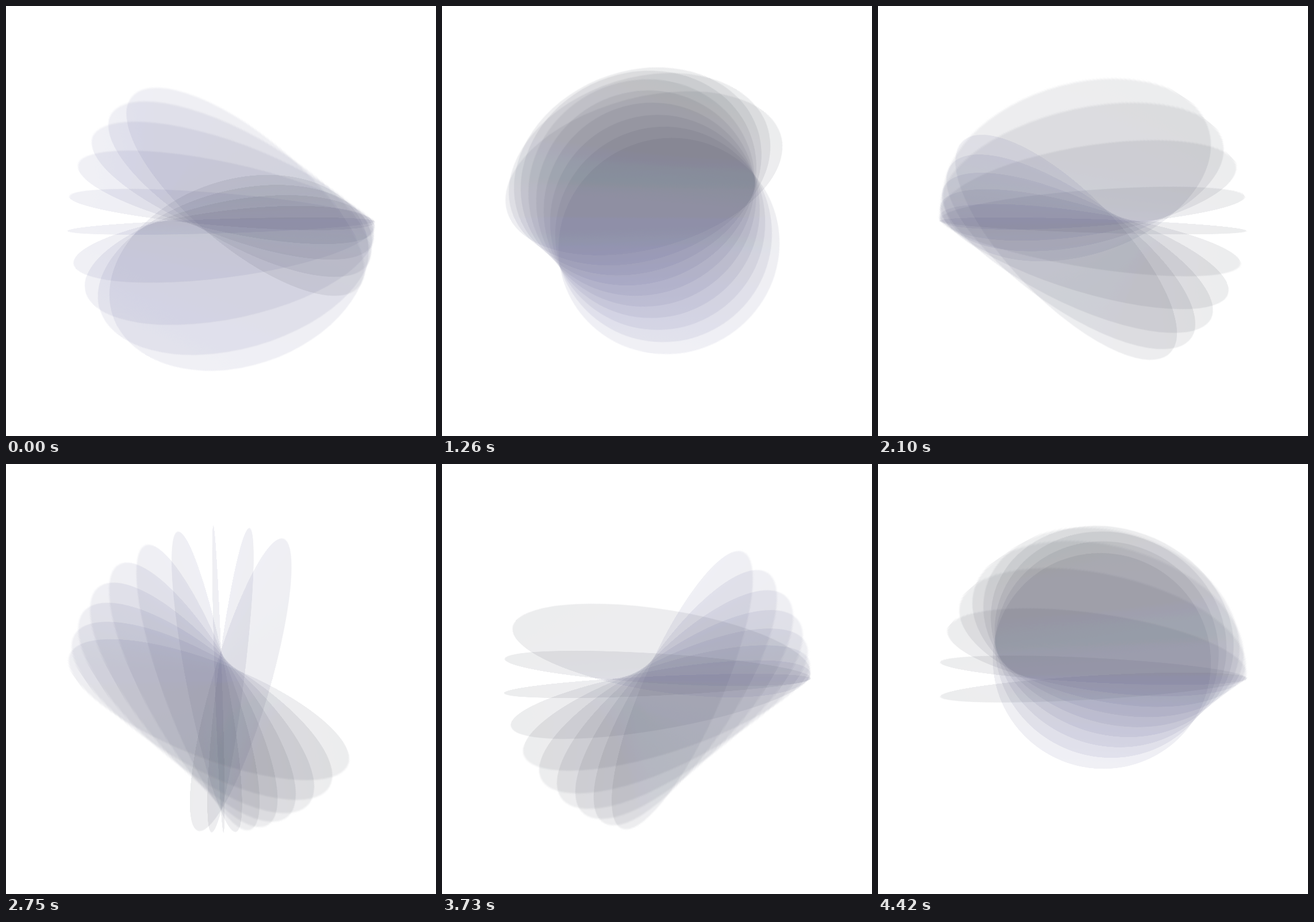
An HTML page for the animation above (4.45 s loop, 748x748 px).

```html
<!DOCTYPE html>
<html lang="en">
<head>
<meta charset="utf-8">
<title>Turning discs</title>
<style>
  html, body {
    margin: 0;
    width: 100%;
    height: 100%;
    overflow: hidden;
    background: #fff;
  }
  #stage {
    position: relative;
    width: 100vw;
    height: 100vh;
    overflow: hidden;
    perspective: 35vmin;
  }
  .disc {
    position: absolute;
    left: calc(50% - 25vmin);
    top: calc(50% - 25vmin);
    width: 50vmin;
    height: 50vmin;
    border-radius: 50%;
    background: linear-gradient(rgb(94, 94, 152), rgb(60, 64, 76));
    opacity: 0.1;
    will-change: transform;
  }
</style>
</head>
<body>
<div id="stage"></div>
<script>
  const LOOP = 4450;     // ms
  const COUNT = 10;
  const STAGGER = 100;   // ms between neighbouring discs
  const SPEED = 0.045;   // degrees per ms around the vertical axis
  const START = -66.25;  // degrees

  const stage = document.getElementById('stage');
  const discs = Array.from({ length: COUNT }, () => {
    const disc = document.createElement('div');
    disc.className = 'disc';
    return stage.appendChild(disc);
  });

  // The tilt runs backwards at twice the speed of the turn.
  function pose(ms) {
    const turn = START + SPEED * ms;
    const tilt = 180 - 2 * turn;
    return `rotateY(${turn.toFixed(3)}deg) rotateX(${tilt.toFixed(3)}deg)`;
  }

  function draw() {
    const t = performance.now() % LOOP;
    discs.forEach((disc, i) => {
      disc.style.transform = pose(t + i * STAGGER);
    });
    requestAnimationFrame(draw);
  }

  draw();
</script>
</body>
</html>
```
